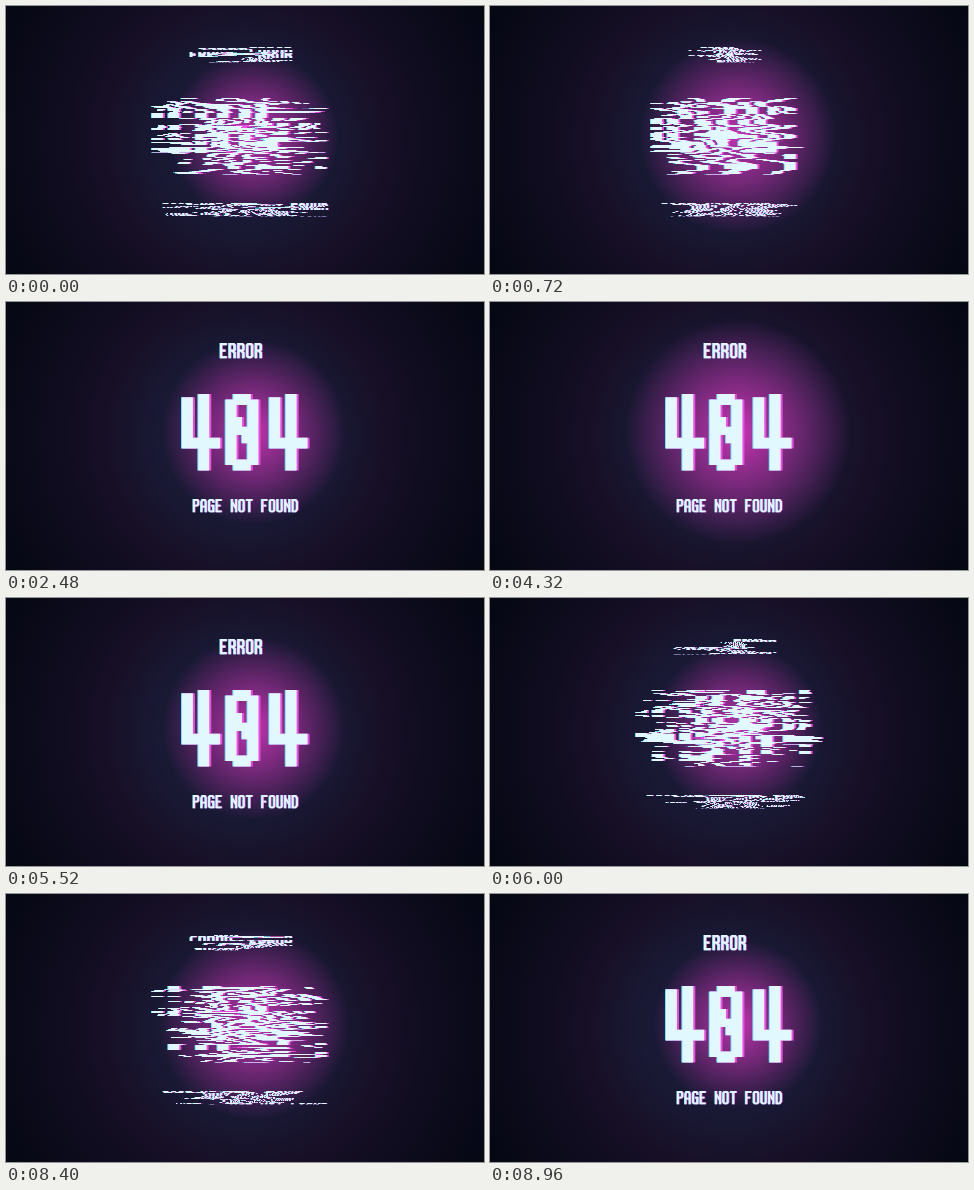
These frames come from a looping animation (478 px wide and 268 px high, 9.04 s). An HTML page with a canvas:

```html
<!DOCTYPE html>
<html lang="en">
<head>
<meta charset="utf-8">
<title>Error 404</title>
<style>
  html, body { margin: 0; width: 100%; height: 100%; overflow: hidden; background: #070814; }
  canvas { display: block; width: 100vw; height: 100vh; }
</style>
</head>
<body>
<canvas id="stage" width="478" height="268" role="img" aria-label="ERROR 404 PAGE NOT FOUND"></canvas>
<script>
const W = 478, H = 268, LOOP = 9040, STEP = 80, PULSE = LOOP / 3;
const ctx = document.getElementById('stage').getContext('2d');

// Pixel lettering: strokes two units wide on an 8 x 14 cell
const GLYPHS = {
  4: 'M1 .6V9H7M4 0V14',
  0: 'M1 1V13M5 1V13M1.4 1H4.6M1.4 13H4.6M2 4.2V6M3 6V7.5M4 7.5V9',
  E: 'M6.2 1H1V13H6.2M1 7H5',
  R: 'M1 14V1H4.5L5.5 2V6L4.5 7H1M3.5 7L5.5 9V14',
  O: 'M2 1H4.5L5.5 2V12L4.5 13H2L1 12V2Z',
  P: 'M1 14V1H4.5L5.5 2V6L4.5 7H1',
  A: 'M1 14V3L2 1H4.5L5.5 3V14M1 8H5.5',
  G: 'M5.5 4V2L4.5 1H2L1 2V12L2 13H5.5V7H3',
  N: 'M1 14V0M5.5 14V0M1 3L5.5 10',
  T: 'M0 1H6.6M3.3 1V14',
  F: 'M6.2 1H1V14M1 7H5',
  U: 'M1 0V12L2 13H4.5L5.5 12V0',
  D: 'M0 1H4L5.5 3V11L4 13H0M1 1V13'
};

// text, x, y, unit, cyan offset, magenta offset
const LINES = [
  ['ERROR', 214, 41, 1.09, -0.6, 0.7],
  ['404', 176, 92, 5.46, -1, 2],
  ['PAGE NOT FOUND', 187, 197, 0.95, -0.6, 0.7]
];

// start, end, furthest sideways shift
const BURSTS = [
  [0, 240, 30], [240, 1040, 15], [1040, 1680, 30], [1680, 2080, 15],
  [2960, 3840, 30], [5600, 5840, 15], [5840, 6640, 30],
  [7840, 8640, 30], [8640, 8800, 20]
];

function layer() {
  const c = document.createElement('canvas');
  c.width = W;
  c.height = H;
  return c.getContext('2d', { willReadFrequently: true });
}

function drawText(g, text, x, y, unit, color) {
  g.strokeStyle = color;
  g.lineWidth = 2;
  [...text].forEach((ch, i) => {
    if (!GLYPHS[ch]) return;
    g.setTransform(unit, 0, 0, unit, x + i * 8 * unit, y);
    g.stroke(new Path2D(GLYPHS[ch]));
  });
  g.resetTransform();
}

const calm = layer(), torn = layer();
for (const [text, x, y, unit, left, right] of LINES) {
  drawText(calm, text, x + left, y, unit, '#62eaff');
  drawText(calm, text, x + right, y, unit, '#ef4be4');
  drawText(calm, text, x, y, unit, '#e2f8ff');
}
const source = new Uint32Array(calm.getImageData(0, 0, W, H).data.buffer);
const output = torn.createImageData(W, H);
const pixels = new Uint32Array(output.data.buffer);

function hash(x, y, seed) {
  let h = Math.imul(x, 374761393) ^ Math.imul(y, 668265263) ^ Math.imul(seed + 1, 1274126177);
  h = Math.imul(h ^ (h >>> 13), 1103515245);
  h = Math.imul(h ^ (h >>> 15), 2246822519);
  return ((h ^ (h >>> 16)) >>> 0) / 4294967296;
}

function noise(x, y, seed) {
  const ix = Math.floor(x), iy = Math.floor(y);
  const ease = f => f * f * (3 - 2 * f);
  const u = ease(x - ix), v = ease(y - iy);
  const mix = (a, b, k) => a + (b - a) * k;
  const row = j => mix(hash(ix, j, seed), hash(ix + 1, j, seed), u);
  return mix(row(iy), row(iy + 1), v) * 2 - 1;
}

const clamp = v => Math.max(-1, Math.min(1, v));

// Wide, thin noise cells that saturate: rows break into shifted copies joined by streaks
function tear(step, reach) {
  const lift = reach > 20 && hash(step, 7, 3) > 0.8 ? 6 : 0;
  pixels.fill(0);
  for (let y = 32; y < 220; y++) {
    for (let x = 140; x < 340; x++) {
      const n = noise(x / 95, y / 1.7, step) * 1.9 + noise(x / 80, y / 8, step + 500) * 0.9;
      const sx = Math.round(x + reach * clamp(n));
      const sy = lift ? Math.round(y + lift * clamp(noise(x / 95, y / 3, step + 900) * 1.4)) : y;
      pixels[y * W + x] = source[sy * W + sx];
    }
  }
  torn.putImageData(output, 0, 0);
}

function radial(x, y, radius, stops) {
  const g = ctx.createRadialGradient(x, y, 0, x, y, radius);
  stops.forEach(([at, color]) => g.addColorStop(at, color));
  ctx.fillStyle = g;
  ctx.fillRect(0, 0, W, H);
}

function render(step) {
  const t = step * STEP;
  const swell = (1 - Math.cos(2 * Math.PI * t / PULSE)) / 2;
  const pink = a => `rgba(206,54,184,${a * (0.88 + 0.07 * swell)})`;
  radial(239, 134, 274, [
    [0, '#1d1b3b'], [0.32, '#191934'], [0.52, '#170f26'], [0.72, '#0e0c1e'], [1, '#050713']
  ]);
  radial(248, 130, 84 + 30 * swell, [[0, pink(1)], [0.5, pink(0.52)], [1, pink(0)]]);
  const burst = BURSTS.find(([from, to]) => t >= from && t < to);
  if (burst) tear(step, burst[2]);
  ctx.drawImage((burst ? torn : calm).canvas, 0, 0);
}

const began = performance.now();
let shown = -1;
function tick() {
  const step = Math.floor((performance.now() - began) % LOOP / STEP);
  if (step !== shown) render(shown = step);
  requestAnimationFrame(tick);
}
tick();
</script>
</body>
</html>
```
